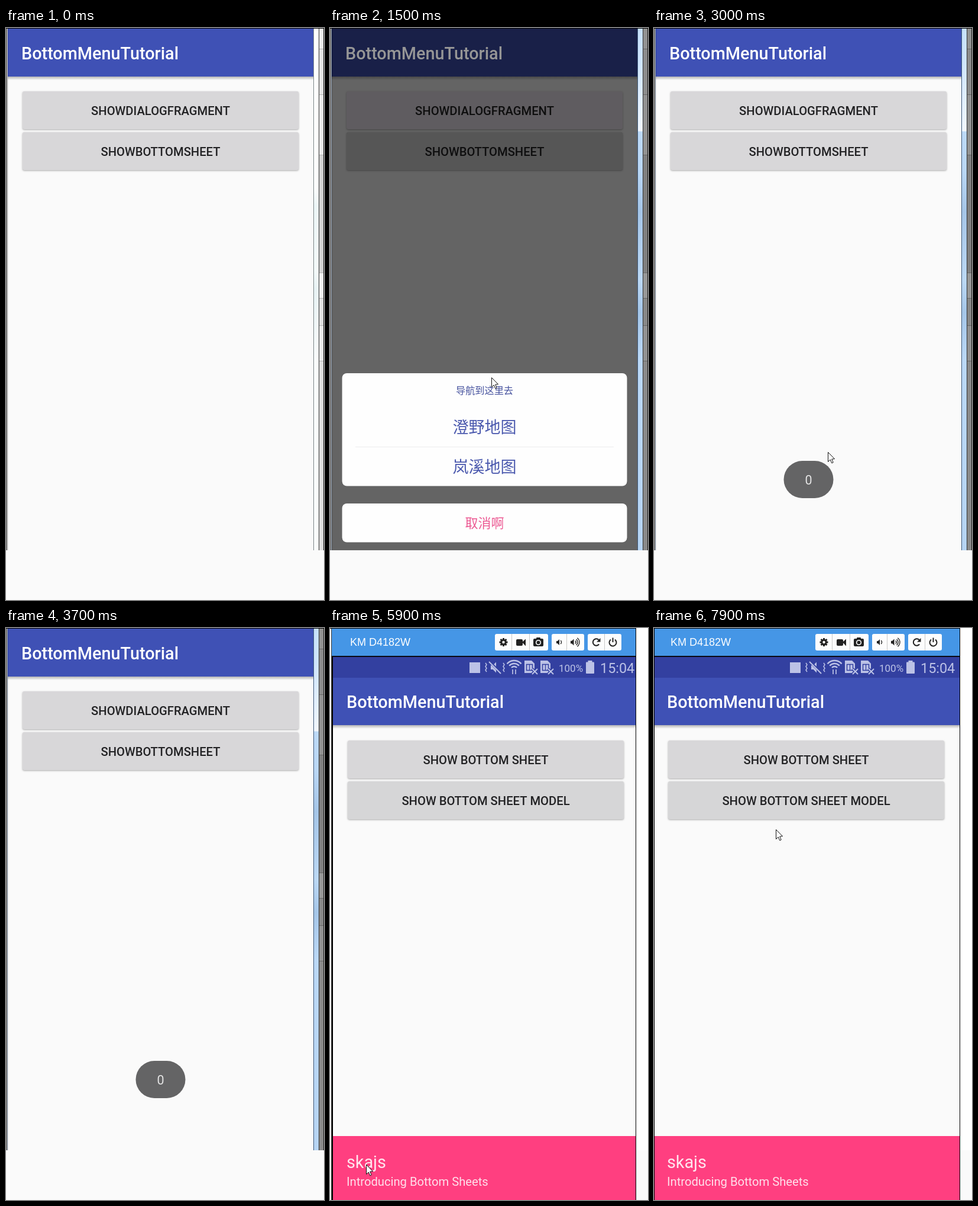
Write an HTML page with a canvas that moves like this. It is 538 px wide and 966 px high and loops after 8 s.

```html
<!DOCTYPE html>
<html lang="en">
<head>
<meta charset="utf-8">
<title>Bottom menu demo</title>
<style>
html, body { margin: 0; width: 100%; height: 100%; overflow: hidden; background: #fafafa; }
canvas { display: block; width: 538px; height: 966px; }
</style>
</head>
<body>
<canvas id="stage" width="538" height="966"></canvas>
<script>
const ctx = document.getElementById('stage').getContext('2d');
const LOOP = 8000, STEP = 100, CUT = 4200, SHIFT = 6300;
const ROBOTO = 'Roboto, sans-serif';
const CJK = '"Noto Sans CJK SC", "Noto Sans CJK", sans-serif';

// Cursor paths as [time, x, y]
const PATH_A = [[100, 530, 420], [300, 400, 270], [600, 262, 146], [1000, 262, 146],
  [1500, 273, 590], [1600, 273, 597], [1700, 271, 610], [1800, 271, 610],
  [2000, 238, 683], [2300, 238, 683], [2600, 269, 722], [3100, 300, 715],
  [3300, 405, 370], [3400, 430, 280], [3600, 536, 60]];
const PATH_B = [[4200, 300, 400], [4600, 262, 225], [5000, 262, 225], [5500, 90, 850],
  [5700, 90, 850], [5900, 61, 906], [6200, 110, 675], [6600, 180, 230], [6900, 190, 280],
  [7100, 190, 280], [7400, 220, 828], [7600, 237, 755], [7750, 253, 540], [7900, 206, 340]];

// Piecewise linear value of column c at time t
function track(keys, t, c = 1) {
  if (t <= keys[0][0]) return keys[0][c];
  for (let i = 1; i < keys.length; i++) {
    const a = keys[i - 1], b = keys[i];
    if (t <= b[0]) return a[c] + (b[c] - a[c]) * (t - a[0]) / (b[0] - a[0]);
  }
  return keys[keys.length - 1][c];
}

function rect(x, y, w, h, fill) {
  ctx.fillStyle = fill;
  ctx.fillRect(x, y, w, h);
}

function round(x, y, w, h, r, fill) {
  ctx.beginPath();
  ctx.roundRect(x, y, w, h, r);
  ctx.fillStyle = fill;
  ctx.fill();
}

function disc(x, y, r, fill) {
  ctx.beginPath();
  ctx.arc(x, y, r, 0, Math.PI * 2);
  ctx.fillStyle = fill;
  ctx.fill();
}

function poly(points, fill) {
  ctx.beginPath();
  points.forEach(([x, y]) => ctx.lineTo(x, y));
  ctx.closePath();
  ctx.fillStyle = fill;
  ctx.fill();
}

function arc(x, y, r, from, to, color, width) {
  ctx.beginPath();
  ctx.arc(x, y, r, from * Math.PI, to * Math.PI);
  ctx.strokeStyle = color;
  ctx.lineWidth = width;
  ctx.stroke();
}

function line(points, color, width) {
  ctx.beginPath();
  points.forEach(([x, y]) => ctx.lineTo(x, y));
  ctx.strokeStyle = color;
  ctx.lineWidth = width;
  ctx.stroke();
}

function text(s, x, y, font, fill, align = 'left') {
  ctx.font = font;
  ctx.textAlign = align;
  ctx.fillStyle = fill;
  ctx.fillText(s, x, y);
}

function clipped(x, y, w, h, draw) {
  ctx.save();
  ctx.beginPath();
  ctx.rect(x, y, w, h);
  ctx.clip();
  draw();
  ctx.restore();
}

function fade(y, h, color) {
  const g = ctx.createLinearGradient(0, y, 0, y + h);
  g.addColorStop(0, color);
  g.addColorStop(1, 'rgba(0,0,0,0)');
  rect(0, y, 538, h, g);
}

function column(x, w, stops) {
  const g = ctx.createLinearGradient(0, 0, 0, 882);
  stops.forEach(([y, c]) => g.addColorStop(y / 882, c));
  rect(x, 1, w, 881, g);
}

function button(label, x, y, fill, ripple) {
  ctx.save();
  ctx.shadowColor = 'rgba(0,0,0,.33)';
  ctx.shadowBlur = 3;
  ctx.shadowOffsetY = 1;
  round(x, y, 467, 64, 3, fill);
  ctx.restore();
  if (ripple) clipped(x, y, 467, 64, () => {
    ctx.globalAlpha = ripple.alpha;
    rect(x, y, 467, 64, '#cbcbcb');
    disc(262, y + 32, ripple.r, '#c3c3c4');
  });
  text(label, x + 233.5, y + 40, '500 20.2px ' + ROBOTO, '#222224', 'center');
}

function appBar(x, y, titleColor) {
  text('BottomMenuTutorial', x, y, '500 28.8px ' + ROBOTO, titleColor);
}

function dialog(dy) {
  ctx.save();
  ctx.translate(0, dy);
  round(20.5, 583, 482, 190.5, 8, '#fefefe');
  round(20.5, 803, 482, 65.5, 8, '#fefefe');
}

function drawDialog(t, dy) {
  dialog(dy);
  if (t >= 2200) clipped(21, 640, 481, 66, () =>
    disc(261.5, 673, track([[2200, 30], [2600, 183], [2800, 260]], t), '#ebe9ec'));
  rect(43, 707, 437, 1, '#ececee');
  const blue = '#4b59ae';
  text('导航到这里去', 261.5, 618, '16.2px ' + CJK, '#46529e', 'center');
  text('澄野地图', 261.5, 684, '27px ' + CJK, blue, 'center');
  text('岚溪地图', 261.5, 751, '27px ' + CJK, blue, 'center');
  text('取消啊', 261.5, 844, '22px ' + CJK, '#ec5a93', 'center');
  ctx.restore();
}

function drawToast(alpha) {
  ctx.save();
  ctx.globalAlpha = alpha;
  round(219.5, 731, 84, 63, 31.5, '#646465');
  text('0', 261.5, 771, '21.5px ' + ROBOTO, '#e4e4e4', 'center');
  ctx.restore();
}

function sideWindow(active) {
  rect(0, 0, 3, 882, '#fff');
  rect(0, 0, 1, 882, '#111');
  rect(2, 1, 1, 881, active ? '#3c4a5c' : '#777');
  if (active) {
    column(521, 8, [[0, '#c6e0fb'], [60, '#cfe5fc'], [174, '#f1f7fe'], [175, '#bcd9f7'],
      [240, '#bad7f5'], [310, '#a5c5e7'], [425, '#bcd8f4'], [480, '#a5c6e8'],
      [560, '#bbd8f6'], [882, '#b6d4f3']]);
  } else {
    column(521, 8, [[0, '#fff'], [270, '#fdfefe'], [300, '#ecf6f7'], [410, '#f4fafa'],
      [440, '#e8f3f5'], [500, '#f0f7f8'], [560, '#fafcfc'], [882, '#fafcfc']]);
  }
  const bands = active
    ? ['#929292', '#8c8c8c', '#929292', '#808080', '#989898', '#888', '#929292', '#8a8a8a']
    : ['#ececec', '#e4e4e4', '#ebebeb', '#d2d2d2', '#f2f2f2', '#e0e0e0', '#ebebeb', '#dedede'];
  const edges = [1, 35, 112, 214, 413, 456, 502, 562, 882];
  bands.forEach((c, i) => {
    rect(530, edges[i], 8, edges[i + 1] - edges[i], c);
    if (i) rect(530, edges[i], 8, 1, active ? '#666' : '#b5b5b5');
  });
  rect(520, 1, 1, 881, active ? '#3d5878' : '#7c8688');
  rect(529, 1, 1, 881, '#333');
  rect(537, 0, 1, 882, '#222');
  rect(0, 0, 538, 1, '#000');
}

function sceneA(t) {
  const dim = track([[1000, 0], [1300, .6], [2600, .6], [2900, 0]], t);
  rect(3, 0, 517, 82, '#3f51b5');
  fade(82, 6, 'rgba(0,0,0,.28)');
  const ripple = t >= 800 && t < 1300 && {
    r: track([[800, 85], [900, 175], [1100, 320]], t),
    alpha: track([[1000, 1], [1300, 0]], t)
  };
  button('SHOWDIALOGFRAGMENT', 28, 107, dim > .5 ? '#efe8f0' : '#d8d7d9', ripple);
  button('SHOWBOTTOMSHEET', 28, 176, '#d8d7d9');
  rect(3, 1, 517, 881, `rgba(0,0,0,${dim})`);
  const v = 255 - 175 * dim;
  appBar(26, 53, `rgb(${v},${v},${v})`);
  if (t > 1100 && t < 2800) {
    const enter = 299 * (1 - Math.min(1, (t - 1100) / 400)) ** 3;
    drawDialog(t, enter + track([[2500, 0], [2600, 117], [2800, 330]], t));
  }
  drawToast(track([[2400, 0], [2600, .45], [2900, 1]], t));
  rect(0, 882, 538, 84, '#fafafa');
  sideWindow(t >= 200);
}

function speaker(x, y, s, color) {
  poly([[x, y - 2 * s], [x + 2 * s, y - 2 * s], [x + 5 * s, y - 5 * s],
    [x + 5 * s, y + 5 * s], [x + 2 * s, y + 2 * s], [x, y + 2 * s]], color);
}

function toolIcons() {
  const ink = '#222';
  for (const [x, w, splits] of [[273, 90, [301, 331]], [369, 55, [394]], [430, 57, [458]]]) {
    round(x, 10, w, 28, 3, '#fdfdfd');
    splits.forEach(s => rect(s, 10, 1, 28, '#c9c9c9'));
  }
  // Gear
  for (let i = 0; i < 8; i++) {
    const a = i * Math.PI / 4, c = Math.cos(a), s = Math.sin(a);
    line([[287.5 + 3 * c, 24 + 3 * s], [287.5 + 7 * c, 24 + 7 * s]], ink, 3);
  }
  arc(287.5, 24, 3.7, 0, 2, ink, 3);
  // Video and photo cameras
  round(309, 19, 11, 11, 2, ink);
  poly([[319, 24], [325, 18.5], [325, 30.5]], ink);
  round(338, 18, 17, 13, 2, ink);
  round(343, 16, 7, 4, 1, ink);
  arc(346.5, 24.5, 3.8, 0, 2, '#fff', 1.6);
  // Volume
  speaker(377, 24, 1, ink);
  arc(382, 24, 3.5, -.3, .3, ink, 1.4);
  speaker(401, 24, 1.1, ink);
  for (const r of [3, 6, 9]) arc(407, 24, r, -.3, .3, ink, 1.4);
  // Rotate and power
  arc(444.5, 24, 5.7, .2, 1.75, ink, 2.1);
  poly([[451.5, 17], [451.5, 23.5], [445, 23.5]], ink);
  arc(472.5, 24.5, 6, -.3, 1.3, ink, 2);
  line([[472.5, 16.5], [472.5, 24]], ink, 2);
}

function statusIcons() {
  const c = '#bcc2e6', bg = '#3340a0';
  rect(230, 58, 18, 18, c);
  // Muted with vibration
  speaker(266, 66.5, 1.8, c);
  line([[264, 57], [283, 76]], bg, 4);
  line([[263, 57], [283, 77]], c, 2);
  for (const x of [257, 287])
    line([[x, 59], [x + 2, 62], [x, 65], [x + 2, 68], [x, 71], [x + 2, 74]], c, 1.5);
  // Wi-Fi
  for (const r of [6, 11, 16]) arc(305.5, 71, r, -.77, -.23, c, 2.4);
  line([[303, 70], [303, 78]], c, 1.7);
  line([[308, 70], [308, 78]], c, 1.7);
  // SIM cards
  for (const x of [323, 350]) {
    poly([[x, 55], [x + 12, 55], [x + 17, 60], [x + 17, 76], [x, 76]], c);
    ctx.strokeStyle = bg;
    ctx.lineWidth = 1.5;
    ctx.strokeRect(x + 3.5, 61.5, 10, 10);
    line([[x + 8.5, 61], [x + 8.5, 72]], bg, 1.3);
    for (const [col, w] of [[bg, 5], [c, 2]]) {
      line([[x + 13, 69], [x + 22, 78]], col, w);
      line([[x + 22, 69], [x + 13, 78]], col, w);
    }
  }
  text('100%', 381, 74, '17px ' + ROBOTO, c);
  round(427, 57.5, 14, 19.5, 1, c);
  rect(430.5, 55, 7, 3, c);
  text('15:04', 451, 75.5, '23.4px ' + ROBOTO, c);
}

function sceneB(t) {
  const dx = t < SHIFT ? 6 : 0;
  const left = dx ? 5 : 1;
  rect(0, 0, 538, 882, '#fff');
  rect(0, 882, 538, 84, '#fafafa');
  rect(left, 1, 517 - left, 965, '#fafafa');
  clipped(left, 0, 517 - left, 966, () => {
    rect(0, 49, 517, 35, '#3340a0');
    rect(0, 84, 517, 80, '#3f51b5');
    fade(164, 6, 'rgba(0,0,0,.28)');
    rect(0, 858, 517, 108, '#ff3f80');
  });
  const bar = dx ? 3 : 1;
  rect(bar, 1, 517 - bar, 46, '#4596e6');
  rect(bar, 47, 517 - bar, 2, '#0a0a14');
  clipped(0, 0, 517, 966, () => {
    ctx.save();
    ctx.translate(dx, 0);
    text('KM D4182W', 28, 30, '18px "Liberation Sans", Arial, sans-serif', '#fff');
    toolIcons();
    statusIcons();
    appBar(22, 135, '#fff');
    button('SHOW BOTTOM SHEET', 24, 190, '#d8d7d9');
    button('SHOW BOTTOM SHEET MODEL', 24, 259, '#d6d6d7');
    text('skajs', 22, 912, '28.8px ' + ROBOTO, '#ffe6ee');
    text('Introducing Bottom Sheets', 22, 942, '20.2px ' + ROBOTO, '#ffe0ea');
    ctx.restore();
  });
  rect(0, 0, 518, 1, '#000');
  rect(517, 0, 1, 966, '#000');
  if (dx) {
    rect(2, 1, 1, 965, '#333');
    rect(3, 47, 2, 919, '#000');
  } else {
    rect(0, 0, 1, 966, '#000');
  }
}

function cursor(path, t) {
  ctx.save();
  ctx.translate(Math.round(track(path, t, 1)) + .5, Math.round(track(path, t, 2)) + .5);
  poly([[0, 0], [0, 16], [3.7, 12.5], [6.3, 18.3], [8.7, 17.2], [6.2, 11.6], [11, 11.2]], '#fff');
  ctx.strokeStyle = '#111';
  ctx.lineWidth = 1;
  ctx.stroke();
  ctx.restore();
}

function draw(t) {
  rect(0, 0, 538, 966, '#fafafa');
  if (t < CUT) {
    sceneA(t);
    if (t >= 100 && t < 3700) cursor(PATH_A, t);
  } else {
    sceneB(t);
    cursor(PATH_B, t);
  }
}

const start = performance.now();
function tick() {
  const t = (performance.now() - start) % LOOP;
  draw(Math.floor(t / STEP) * STEP);
  requestAnimationFrame(tick);
}
tick();
</script>
</body>
</html>
```
